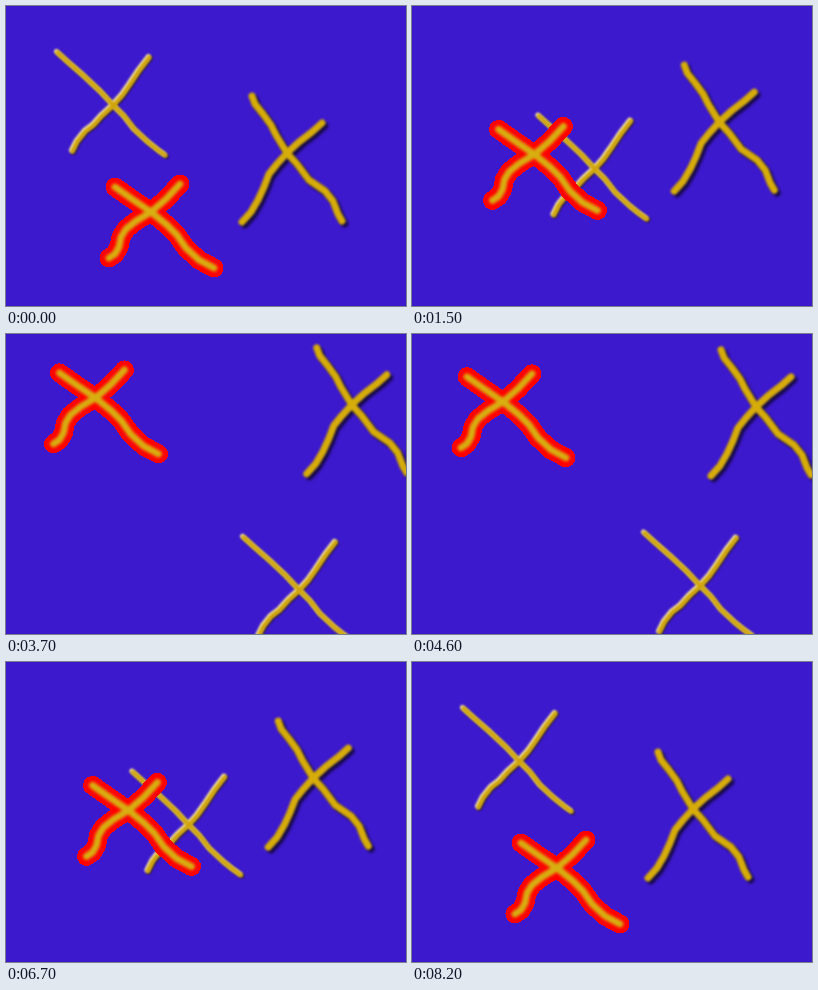
An HTML page for the animation above (8300 ms loop, 400 by 300 pixels).

```html
<!DOCTYPE html>
<html>
<head>
<meta charset="utf-8">
<style>
  html, body { margin: 0; width: 100%; height: 100%; overflow: hidden; background: #3d19cd; }
  svg { display: block; width: 400px; height: 300px; }
  path { fill: none; stroke-linecap: round; stroke-linejoin: round; }
</style>
</head>
<body>
<svg viewBox="0 0 400 300" color-interpolation-filters="sRGB">
  <defs>
    <filter id="soft" x="-20%" y="-20%" width="140%" height="140%"><feGaussianBlur stdDeviation="0.9"/></filter>
    <filter id="glowing" x="-20%" y="-20%" width="140%" height="140%"><feGaussianBlur stdDeviation="1.4"/></filter>
    <filter id="shadow" x="-20%" y="-20%" width="140%" height="140%"><feGaussianBlur stdDeviation="1.8"/></filter>
    <path id="thin" d="M51 46L62 56 78 70 94 85 107 99 118 110 128 123 142 136 152 144 159 149M143 51L133 64 123 79 116 89 107 99 96 109 87 119 79 125 71 135 66 145"/>
    <path id="bold" d="M246 90L249 98 257 108 265 119 270 129 281 147 291 158 303 174 319 185 327 195 332 208 336 215M316 117L306 126 293 136 281 147 271 158 263 168 258 181 252 194 245 206 236 216"/>
    <path id="glow" d="M109 181L126 193 145 206 161 219 171 229 180 242 193 254 208 262M174 178L160 193 145 206 130 215 120 223 115 231 113 241 109 248 103 252"/>
  </defs>
  <g class="cross">
    <use href="#bold" x="2.8" y="2.8" stroke="#0a0424" stroke-width="7" opacity=".8" filter="url(#shadow)"/>
    <use href="#bold" stroke="#d6ac0a" stroke-width="7" filter="url(#soft)"/>
  </g>
  <g class="cross">
    <use href="#thin" x="1.3" y="1.3" stroke="#140a20" stroke-width="5" opacity=".8" filter="url(#soft)"/>
    <use href="#thin" x="-.7" y="-.7" stroke="#fff2b0" stroke-width="4.5" filter="url(#soft)"/>
    <use href="#thin" x=".5" y=".5" stroke="#cfa40c" stroke-width="4.6" filter="url(#soft)"/>
  </g>
  <g class="cross">
    <use href="#glow" stroke="#f00" stroke-width="19" shape-rendering="crispEdges"/>
    <use href="#glow" stroke="#d8ae10" stroke-width="6.8" filter="url(#glowing)"/>
  </g>
</svg>
<script>
  const STEP = 100, LOOP = 8300, TURN = 41;
  // Travel per step for each cross, in page order
  const speeds = [[1.75, -2.06], [5.03, 4.24], [-1.5, -3.84]];
  const crosses = document.querySelectorAll('.cross');

  function draw(now) {
    const step = Math.floor(now % LOOP / STEP);
    const travel = TURN - Math.abs(TURN - step);
    crosses.forEach((cross, i) => {
      const [dx, dy] = speeds[i];
      cross.setAttribute('transform', `translate(${dx * travel} ${dy * travel})`);
    });
    requestAnimationFrame(() => draw(performance.now()));
  }
  draw(performance.now());
</script>
</body>
</html>
```
